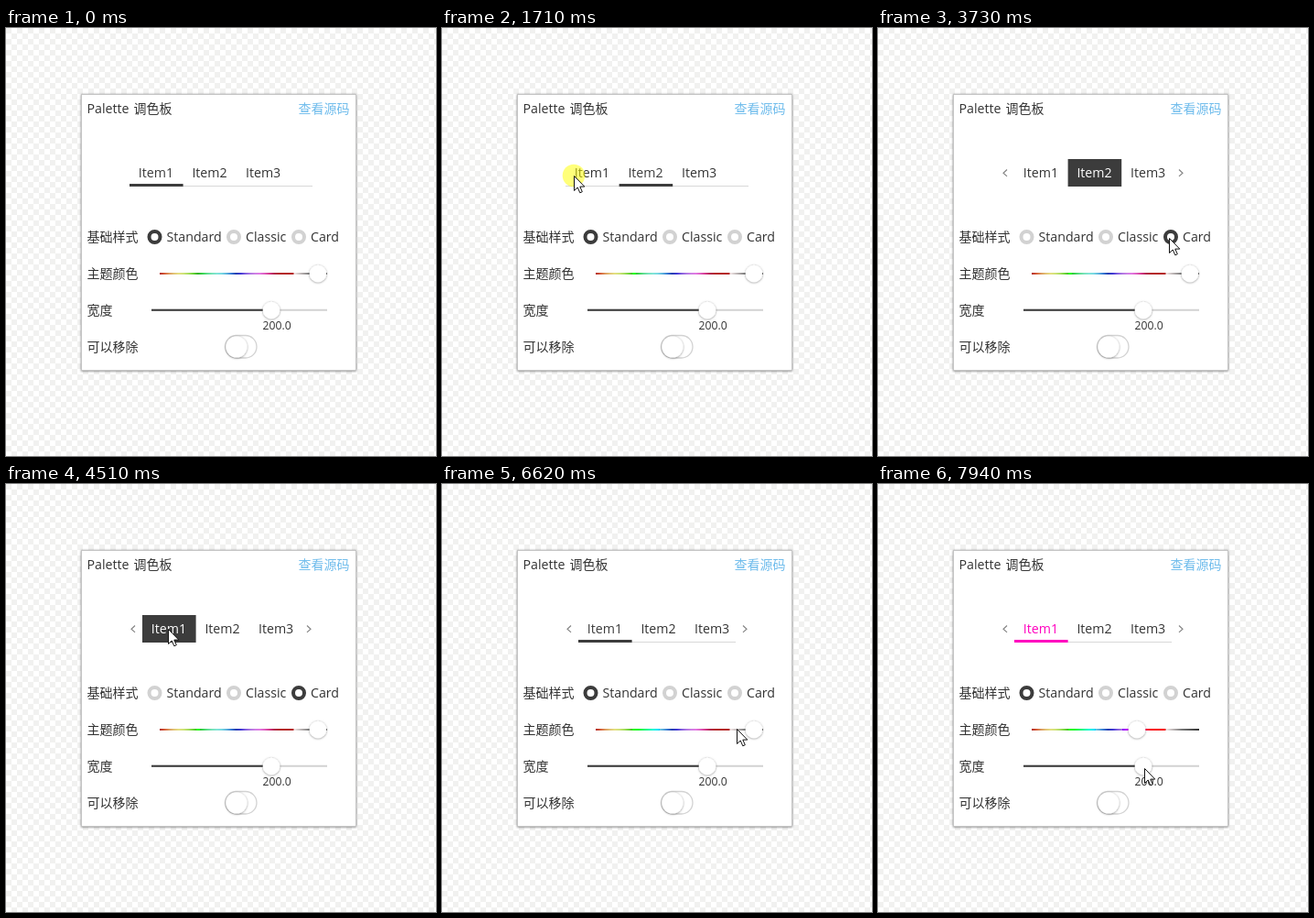
These frames come from a looping animation (470 px wide and 467 px high, 8000 ms). An HTML page:

```html
<!DOCTYPE html>
<html lang="zh">
<head>
<meta charset="utf-8">
<title>Palette</title>
<style>
html, body { margin: 0; width: 100%; height: 100%; overflow: hidden; background: #fff; }
svg { display: block; width: 470px; height: 467px; }
text { font: 14.2px "Open Sans", "Noto Sans", sans-serif; fill: #333; }
.cjk { font: 14px "Noto Sans CJK SC", "Noto Sans CJK", sans-serif; }
.link { fill: #6fbcec; }
.small { font-size: 12.2px; }
</style>
</head>
<body>
<svg viewBox="0 0 470 467" xmlns="http://www.w3.org/2000/svg">
  <defs>
    <pattern id="check" width="12" height="12" patternUnits="userSpaceOnUse">
      <path d="M0 0h6v6h-6zM6 6h6v6h-6z" fill="#f1f1f0"/>
    </pattern>
    <filter id="soft" x="-30%" y="-30%" width="160%" height="160%">
      <feDropShadow dx="0" dy="0.5" stdDeviation="1.3" flood-color="#000" flood-opacity=".5"/>
    </filter>
    <linearGradient id="pale" gradientUnits="userSpaceOnUse" x1="168" x2="351" y1="0" y2="0"/>
    <linearGradient id="vivid" gradientUnits="userSpaceOnUse" x1="168" x2="351" y1="0" y2="0"/>
  </defs>
  <rect width="470" height="467" fill="url(#check)"/>
  <rect x="82.5" y="72.5" width="300" height="301" fill="#fff" stroke="#c4c4c4" filter="url(#soft)"/>
  <g id="labels"></g>
  <g id="tabs">
    <path id="base" stroke="#d8d8d8" fill="none"/>
    <rect id="mark"/>
    <path id="arrows" d="M141 154.500l-4 3.700 4 3.700M329 154.500l4 3.700-4 3.700" fill="none" stroke="#858585" stroke-width="1.200"/>
  </g>
  <g id="radios" fill="#fff" stroke-width="4"></g>
  <rect x="168" y="267" width="183" height="2" fill="url(#pale)"/>
  <g id="bright" fill="url(#vivid)"></g>
  <path d="M159 307.700h192" stroke="#d2d2d2" stroke-width="2"/>
  <path d="M159 307.700h131" stroke="#3a3a3a" stroke-width="2"/>
  <circle id="thumb" cy="268" r="9.300" fill="#fff" filter="url(#soft)"/>
  <circle cx="290" cy="308" r="9.300" fill="#fff" filter="url(#soft)"/>
  <rect x="239.500" y="335.500" width="34.500" height="24.500" rx="12.250" fill="#fff" stroke="#d2d2d2" stroke-width="1.300"/>
  <circle cx="252" cy="348" r="11.500" fill="#fff" filter="url(#soft)"/>
  <circle id="press" r="12.300" fill="#ff0" fill-opacity=".52"/>
  <path id="cursor" d="M.500.500v16l3.700-3.500 2.600 5.800 2.500-1.100-2.500-5.600h5z" fill="#fff" stroke="#111"/>
</svg>
<script>
const LOOP = 8000, DARK = '#3c3c3c', TAB = 58.6, PRESS = 80;
const LINE = 0, BOX = 1, CARD = 2;
const DRAG = { from: 6850, stop: 7310, release: 7480 };

const $ = id => document.getElementById(id);
const set = (el, attrs) => { for (const k in attrs) el.setAttribute(k, attrs[k]); return el; };
const show = (el, on) => set(el, { visibility: on ? 'visible' : 'hidden' });
const add = (parent, tag, attrs, content = '') => {
  const el = set(document.createElementNS('http://www.w3.org/2000/svg', tag), attrs);
  el.textContent = content;
  parent.appendChild(el);
  return el;
};
const label = (x, y, s, cls = '') => add($('labels'), 'text', { x, y, class: cls }, s);

label(88.5, 93, 'Palette');
label(139.5, 93, '调色板', 'cjk');
label(319.5, 93, '查看源码', 'cjk link');
['基础样式', '主题颜色', '宽度', '可以移除'].forEach((s, i) => label(88.5, 233 + 40 * i, s, 'cjk'));
label(280.5, 329, '200.0', 'small');

const items = [1, 2, 3].map(n => add($('tabs'), 'text', { y: 163 }, 'Item' + n));
const rings = [[162.5, 'Standard'], [249, 'Classic'], [320, 'Card']].map(([cx, name]) => {
  label(cx + 13, 233, name);
  return add($('radios'), 'circle', { cx, cy: 228, r: 6 });
});

// Colour track: one hue sweep over 146 px, then white to black
const hue = u => 400 * Math.min(u, .9);
const lightness = u => 42 + 28 * Math.abs(Math.sin(3.5 * Math.PI * Math.min(u, .86)));
const stop = (id, px, color) => add($(id), 'stop', { offset: px / 183, 'stop-color': color });
for (let i = 0; i <= 28; i++) {
  const u = i / 28;
  stop('pale', 146 * u, `hsl(${hue(u)},65%,${lightness(u)}%)`);
  stop('vivid', 146 * u, `hsl(${hue(u)},95%,50%)`);
}
stop('pale', 147, '#f4e8e8');
stop('pale', 164, '#777');
stop('pale', 183, '#333');

// Spans of the track that turn vivid as the pointer passes
const spans = [[400, 208, 4], [5800, 208, 30], [7200, 267, 47]]
  .map(([from, x, width]) => ({ from, el: add($('bright'), 'rect', { x, y: 267, width, height: 2 }) }));

// Pointer stops: rests at x, y from `at` to `go`; a click acts as it leaves
const stops = [
  { at: 70, go: 70, x: 349, y: 455 },
  { at: 780, go: 1320, x: 212, y: 157, act: { tab: 1 } },
  { at: 1560, go: 1790, x: 144, y: 161, act: {} },
  { at: 2270, go: 2510, x: 256, y: 227, act: { style: BOX, scroll: true } },
  { at: 2510, go: 2740, x: 256, y: 227 },
  { at: 3190, go: 3450, x: 333, y: 229, act: { style: CARD } },
  { at: 3730, go: 3730, x: 318, y: 229 },
  { at: 4200, go: 4370, x: 177, y: 151, act: { tab: 0 } },
  { at: 4510, go: 4890, x: 177, y: 158 },
  { at: 5290, go: 5530, x: 194, y: 233, act: { style: LINE } },
  { at: 6230, go: 6310, x: 315, y: 279 },
  { at: 6620, go: 6620, x: 322, y: 267 },
  { at: 6700, go: DRAG.from, x: 335, y: 269 },
  { at: DRAG.stop, go: DRAG.release, x: 279, y: 265 },
  { at: 7760, go: 7760, x: 305, y: 315 },
  { at: 7940, go: LOOP, x: 291, y: 310 }
];

function pointer(t) {
  const i = Math.max(1, stops.findIndex(s => t < s.go));
  const a = stops[i - 1], b = stops[i];
  const u = Math.min(1, Math.max(0, (t - a.go) / (b.at - a.go)));
  const k = u * u * (3 - 2 * u);
  return [a.x + (b.x - a.x) * k, a.y + (b.y - a.y) * k];
}

function stateAt(t) {
  const done = stops.filter(s => s.act && t >= s.go).map(s => s.act);
  return Object.assign({ tab: 0, style: LINE, scroll: false }, ...done);
}

function trackColor(x) {
  const u = (x - 168) / 146;
  return u <= 1 ? `hsl(${hue(u)},100%,50%)` : `hsl(0,0%,${Math.max(23, 100 - (x - 314) * 2.85)}%)`;
}

function drawTabs({ tab, style, scroll }, accent) {
  const left = scroll ? 149 : 135, right = scroll ? 321 : 335;
  const x = left + TAB * tab;
  const a = Math.floor(x) + .5, b = Math.floor(x + TAB) - .5;

  items.forEach((el, i) => {
    set(el, { x: left + 9.8 + TAB * i });
    el.style.fill = i !== tab ? '#333' : style === CARD ? '#fff' : accent;
  });
  rings.forEach((el, i) => set(el, { stroke: i === style ? DARK : '#d2d2d2' }));
  show($('arrows'), scroll);
  show($('base'), style !== CARD);
  show($('mark'), style !== BOX);
  set($('base'), {
    d: style === BOX ? `M${left} 172.5H${a}V143.5H${b}V172.5H${right}` : `M${left} 172.5H${right}`
  });
  const height = style === CARD ? 30 : 3;
  set($('mark'), { x, y: 173 - height, width: TAB, height, fill: accent });
}

function render(t) {
  const [x, y] = pointer(t);
  const drag = t < DRAG.from ? 0 : t < DRAG.stop ? (335 - x) / 56 : 1;
  const thumb = 341 - 58 * drag;
  const pressed = (t >= DRAG.from && t < DRAG.release) ||
    stops.some(s => s.act && t >= s.go - PRESS && t < s.go);

  drawTabs(stateAt(t), drag ? trackColor(thumb) : DARK);
  set($('thumb'), { cx: thumb });
  spans.forEach(s => show(s.el, t >= s.from));
  show(set($('cursor'), { transform: `translate(${x} ${y})` }), t >= stops[0].at);
  show(set($('press'), { cx: x, cy: y }), pressed);
}

const start = performance.now();
function tick() {
  render((performance.now() - start) % LOOP);
  requestAnimationFrame(tick);
}
tick();
</script>
</body>
</html>
```
